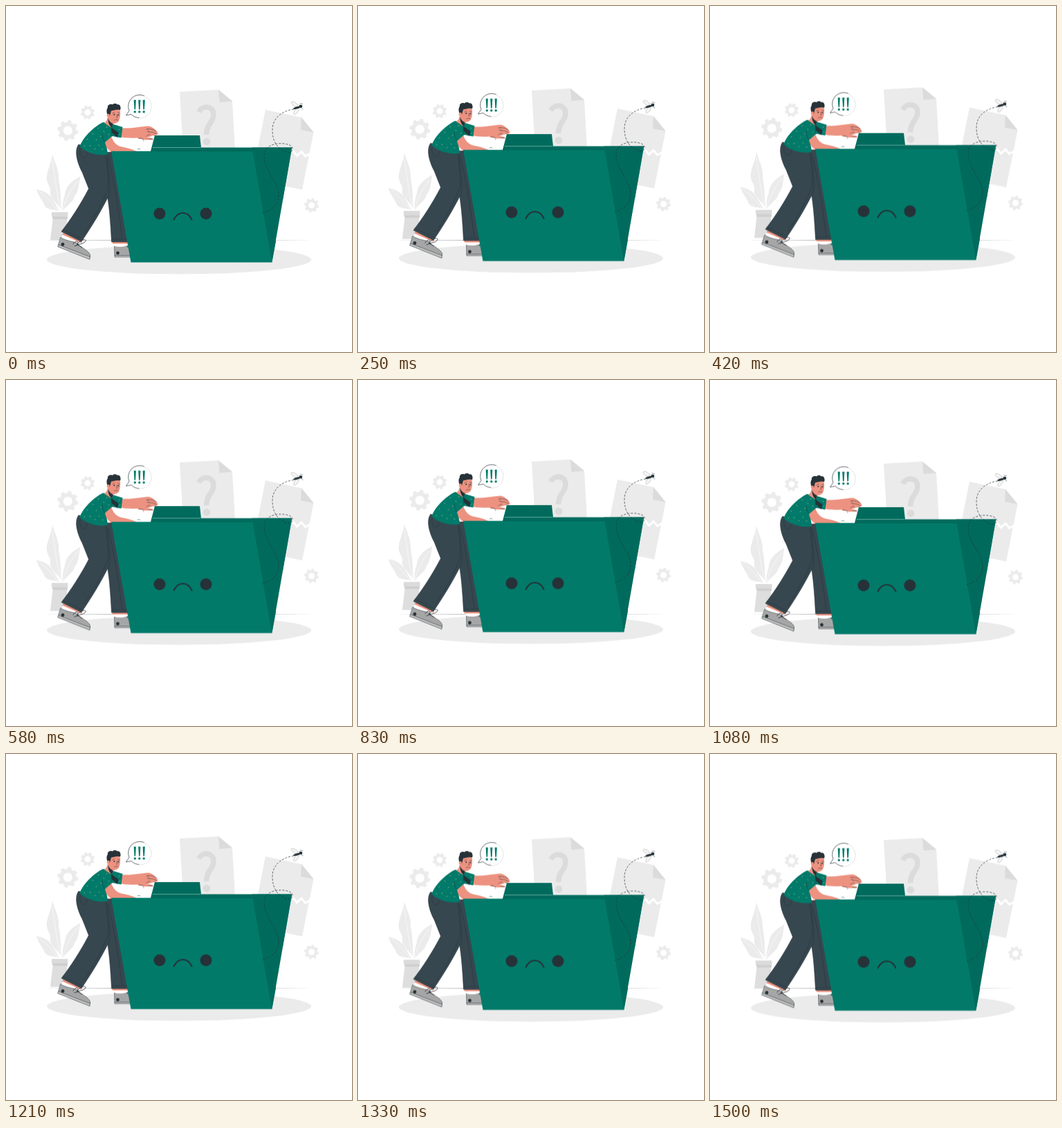
An HTML page that plays this animation: 500x500 px, repeating every 1.54 s.

```html
<!DOCTYPE html>
<html lang="en">
<head>
<meta charset="utf-8">
<title>Heavy folder</title>
<style>
  html, body { margin: 0; width: 100%; height: 100%; overflow: hidden; background: #fff; }
  svg { display: block; width: 100vw; height: 100vh; }
  .float { animation: float 1540ms linear infinite; }
  @keyframes float {
    0%, 100% { transform: translateY(0); }
    16.23% { transform: translateY(-1.9px); }
    37.66% { transform: translateY(-4.8px); }
    51.3% { transform: translateY(-6.4px); }
    53.9% { transform: translateY(-6.2px); }
    70.13% { transform: translateY(-3.2px); }
    86.36% { transform: translateY(-.7px); }
    97.4% { transform: translateY(.4px); }
  }
  .pale { fill: #ebebeb; }
  .fold { fill: #dbdbdb; }
  .teal { fill: #017a6a; }
  .deep { fill: #006b5d; }
  .ink { fill: #263238; }
  .shoe { fill: #a6a6a6; }
  .sole { fill: #bfbfbf; }
  .pants { fill: #37474f; stroke: #263238; stroke-width: .5; }
  .skin { fill: #ed9280; }
  .line { fill: none; stroke: #263238; stroke-width: .8; stroke-linecap: round; stroke-linejoin: round; }
  .thin { stroke-width: .5; }
  .gear circle { fill: none; stroke: #ebebeb; }
</style>
</head>
<body>
<svg viewBox="0 0 500 500">
  <defs>
    <g id="gear" class="gear">
      <circle r="9.4" stroke-width="5.6"/>
      <circle r="12.7" stroke-width="4.6" pathLength="16" stroke-dasharray="1"/>
    </g>
    <g id="bang">
      <path d="M-1.6 -8.8H1.6L.8 5H-.8Z"/>
      <circle cy="8.4" r="1.7"/>
    </g>
  </defs>

  <path d="M52 338.4L250 338.1 445 338.4 250 338.7Z" class="ink" opacity=".8"/>

  <g class="float">
    <use href="#gear" transform="translate(89.3 180)"/>
    <use href="#gear" transform="translate(118 153.8) rotate(15) scale(.68)"/>
    <use href="#gear" transform="translate(441.5 288) scale(.7)"/>

    <!-- papers -->
    <path class="pale" d="M251 124L307 121 327 137.5 331 208H256Z"/>
    <path class="fold" d="M307 121L308.5 139 327 137.5Z"/>
    <path d="M278.500 153C283.500 143 300 143.500 300 157C300 168.500 289.500 170 289.500 186" fill="none" stroke="#dbdbdb" stroke-width="7.5"/>
    <circle class="fold" cx="290" cy="196" r="5.3"/>
    <path class="pale" d="M375 150L427 161 444.5 182.5 428 265.5 355 250Z"/>
    <path class="fold" d="M427 161L426 179 444.5 182.5Z"/>
    <path d="M404 211L414 208.5 420.5 216.5 427 210.5 432.5 217 442 212" fill="none" stroke="#fff" stroke-width="3"/>

    <!-- plant -->
    <path class="pale" d="M67 214C70 226 77 236 76 250C79 264 79 276 79.500 294C74 284 62 278 64 267C65 261 57 256 59 245C61 233 66 226 67 214Z
      M44 265C56 267 65 273 68 281C72 286 74 291 77 297C69 293 62 296 56 289C53 280 47 276 44 265Z
      M107.500 246C94 253 86 261 85 273C82 281 81 290 81.500 298C85 289 97 285 99 275C106 267 105 256 107.500 246Z"/>
    <path d="M67 222Q71 255 79 298M48 268Q66 281 77 299M104 252Q85 276 81 299" fill="none" stroke="#fff" stroke-width=".6"/>
    <path d="M68 304H88.5L87 338.5H64Z" fill="#dedede"/>
    <path d="M67 304H89V308H67.5Z" fill="#cfcfcf"/>
    <path class="fold" d="M66 298H89.5V304.5H66Z"/>

    <ellipse class="pale" cx="250" cy="366.5" rx="191" ry="21"/>

    <!-- far leg -->
    <path d="M154 339H178V348H156Z" fill="#fff"/>
    <path class="skin" d="M153.5 341H176V343.500H154Z"/>
    <path class="shoe" d="M156.500 347C163 349 170 348 176 346L184 350V362.500H157Z"/>
    <path class="sole" d="M157 360.500H184V362.800H157Z"/>
    <path class="line thin" d="M157 360.500H183M156.500 347L157 362.800H183"/>
    <circle class="ink" cx="161.500" cy="357" r="2.400"/>
    <path class="line" d="M180 348C175 344 173 348 177 349L182 350"/>
    <path class="pants" d="M128 212L153 211 167 285 176 341H152.500C151 312 149 285 145 268L132 235Z"/>
    <path class="line thin" d="M152.500 337H175M148 219Q160 270 168 336"/>

    <!-- near leg -->
    <path d="M83 327L109 339 106 346 80 337Z" fill="#fff"/>
    <path class="skin" d="M83 327.500L110 340 109 342.500 81.500 330.500Z"/>
    <path class="shoe" d="M79 334.500C86 339 95 340 102 342C107 349 119 352 121.800 360L121 366 75 347.500Z"/>
    <path class="sole" d="M76 345L121.800 362.500 121 366.300 75 348Z"/>
    <path class="line thin" d="M79 334.500C86 339 95 340 102 342C107 349 119 352 121.800 360L121 366.300 75 348ZM76 345L121.600 362.500"/>
    <circle class="ink" cx="82" cy="344.500" r="2.400"/>
    <path class="line" d="M97 344C101 337 107 340 102 345M103 345C108 335 119 337 114 341C111 344 106 344 103 345L110 349M99 347L105 345"/>
    <path class="pants" d="M105 200C98 209 103 227 110 240L119.500 264C108 286 94 308 80 326L109 340.500C122 322 139 294 149 273C151 262 149 238 145 213Z"/>
    <path class="line thin" d="M82 323L111 337M107 205C105 218 113 226 118 212M144 217Q149 244 147 265Q136 294 113 329"/>

    <!-- arms and shirt -->
    <path class="skin" d="M164 176C178 178 194 174 206 173.500C212 174.500 218 180 219.500 184.500C218 187.500 213 186 209 188.500C203 191 195 190.500 190 190.500C180 191 170 191 162 188Z"/>
    <path class="skin" d="M139 196L152 188C155 197 160 202 167 203.500C177 205.500 185 207.500 190 211H152C147 207 142 202 139 196Z"/>
    <path class="skin" d="M190 190C197 188 205 190 212 191L212.500 193 202 193.500 191 191.500Z"/>
    <path class="line thin" d="M203 178Q211 176 217 181M204 181Q211 180 217 184M203 188Q209 183 215 187M192 191Q200 191 199 195M206 192L212 193M190 207Q192 205 194 207"/>
    <path class="teal" d="M140 168C128 174 112 188 106.500 203C115 212 132 217 147 214.500C147 207 144 201 143 197L153.500 188 166.500 190.500 168.500 175 152 170Z"/>
    <path class="ink" d="M151 173L154 177 162.500 183 161 190 153 183Z"/>
    <path class="line thin" d="M142 196Q139 190 139 185M153.500 188Q152 184 152 180"/>
    <path d="M117 193l1-1M125 184l1 1M133 177l1-1M141 181l1 1M121 202l1 0M130 194l1-1M137 188l0 1M128 207l1-1M139 207l1 0M113 202l1 1M145 175l1 0M148 186l1-1M163 178l1 1M134 201l1 1M164 186l1-1" stroke="#d9d2a0" stroke-width=".8" stroke-linecap="round" opacity=".8"/>

    <!-- head -->
    <path class="skin" d="M147 152C151 146 163 147 165 152C165.500 160 164.500 167 159.500 169C157 170 155 169.500 154 171.500L152.500 176 142 169C147 166 147 160 147 156Z"/>
    <path class="ink" d="M147.500 162C149 167 152 169 154.500 170L153 176C148.500 172 147.500 168 147.500 162Z"/>
    <path class="ink" d="M147 158C145 154 145 149 147 147C146 143 151 141 154 142.500C156 140 160 141 161 142.500C164 141 167 146 165 150.500C161 148.500 156 151 152 151.500L150 159Z"/>
    <circle class="skin" cx="147.800" cy="158" r="2.200"/>
    <circle class="ink" cx="156.300" cy="157" r="1"/>
    <circle class="ink" cx="162.300" cy="157.500" r="1"/>
    <path class="line thin" d="M154 155L157 153.500M161.500 154L164 155M160 157L161 161 159.500 161M156.500 165Q159 163 162 165"/>

    <!-- speech -->
    <path d="M173.500 158L178 151.500A16.600 16.600 0 1 1 181 156.500Z" fill="#fff" stroke="#bbb" stroke-width=".4"/>
    <path class="line" style="stroke-width:.6" d="M199.500 129.500A16.600 16.600 0 0 0 178 151.500L173.500 158 181 156.500A16.600 16.600 0 0 0 192 161.500"/>
    <g class="teal">
      <use href="#bang" x="186.300" y="144.500"/>
      <use href="#bang" x="192.800" y="144.500"/>
      <use href="#bang" x="199.200" y="144.500"/>
    </g>

    <!-- folder -->
    <path class="deep" d="M215 187H280L282 204.500H413L400 280H230L209 209.700Z"/>
    <path class="teal" d="M152 209.700H360L390 340 384.300 370.600H180.500Z"/>
    <path class="deep" d="M355.500 204.500H413.300L384.300 370.600Z"/>
    <path d="M212 204.500H281.500" stroke="#9ccbc3" stroke-width=".6"/>
    <path d="M209 209.700H356" stroke="#00594d" stroke-width=".4"/>
    <path class="skin" d="M205 175C212 175 218 180 219.500 184.500C218.500 187.500 214 186 209 187Z"/>
    <path class="line thin" d="M205 178Q212 177 217 181M206 182Q212 181 217 184.500"/>
    <g class="ink">
      <circle cx="222" cy="300" r="8.500"/>
      <circle cx="289" cy="300" r="8.500"/>
    </g>
    <path class="line" d="M242.500 308.800C249 295.800 262.500 295.800 268.500 308.800" style="stroke-width:2"/>

    <!-- fly -->
    <path class="line" style="stroke-width:.7;stroke-linecap:butt" stroke-dasharray="3 2" d="M416 149C397 152 385 163 385 179C385 196 392 206 405 211C414 214 418 205 410 201C398 196 378 199 374 210C368 232 392 252 394 270C395 285 386 295 371 299"/>
    <g fill="#f5f5f5" stroke="#aaa" stroke-width=".5">
      <ellipse cx="417" cy="142" rx="5.500" ry="2.500" transform="rotate(35 417 142)"/>
      <ellipse cx="419.500" cy="152" rx="5.500" ry="2.300" transform="rotate(-55 419.500 152)"/>
    </g>
    <g class="ink">
      <ellipse cx="420.500" cy="147" rx="5.500" ry="1.500" transform="rotate(-15 420.500 147)"/>
      <circle cx="426" cy="145" r="2.300"/>
    </g>
    <path class="line thin" d="M425 141L428.500 141.500M427 148L429 149M423 143L426 145"/>
  </g>
</svg>
</body>
</html>
```
